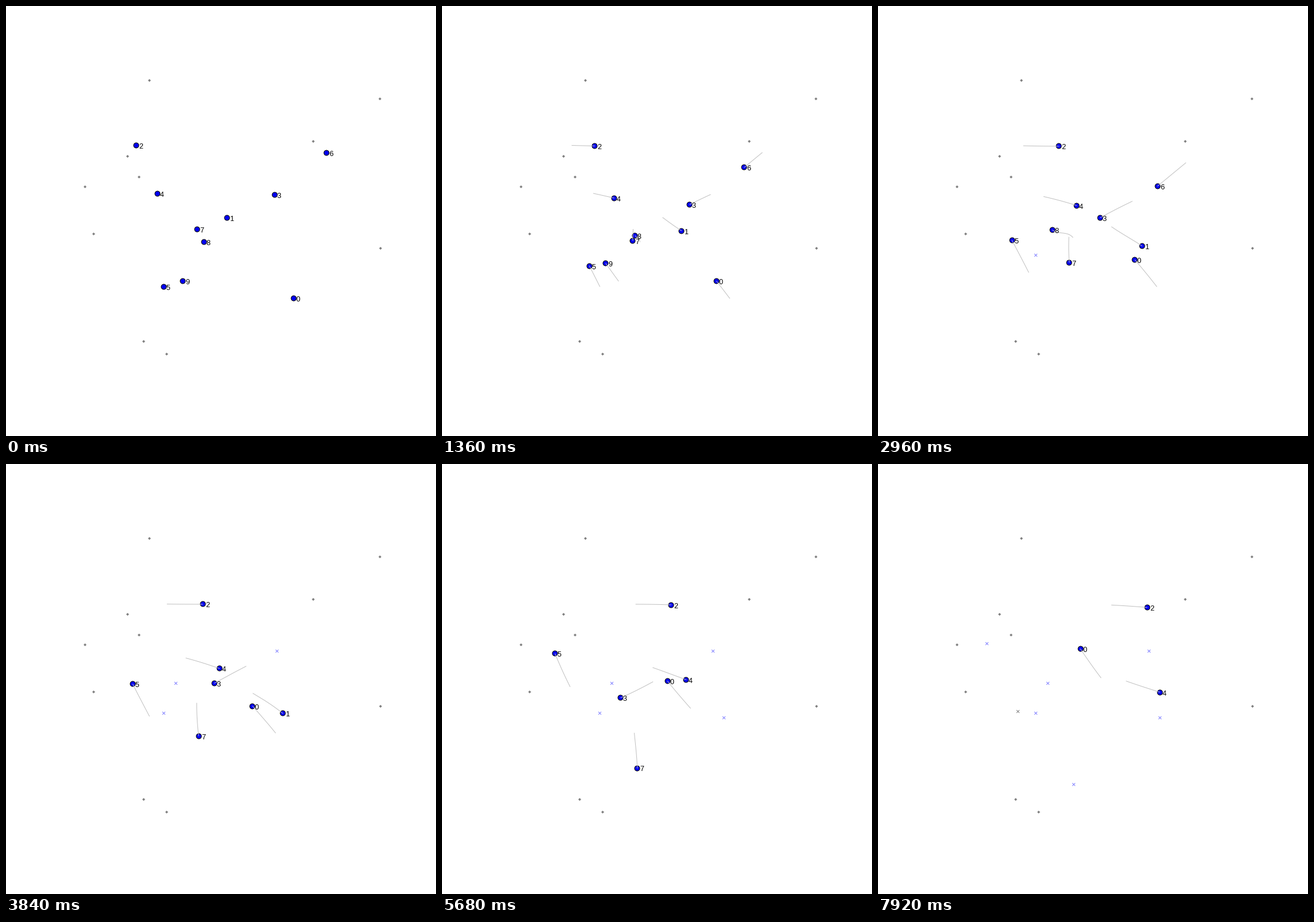
Animation of 748 by 748 pixels, one loop 8 s. Source, as a matplotlib script:

```python
import numpy as np
import matplotlib.pyplot as plt
from matplotlib.animation import FuncAnimation
from matplotlib.patches import Circle, RegularPolygon

SIZE, DPI = 748, 100
FRAMES, INTERVAL = 100, 80
PX = 72 / DPI
TRAIL = 25      # frames of history behind each agent
CRUISE = 2.47   # pixels per frame
GIVE_WAY = 26   # frames during which late agents hold back

GOALS = [(249, 129), (650, 161), (534, 235), (211, 261), (231, 297),
         (137, 314), (152, 396), (651, 421), (239, 583), (279, 605)]


def travel(distance, duration):
    """Distance covered at each frame: soft start, cruise, late agents slower."""
    t = np.linspace(0, duration, 20 * FRAMES)
    hold = max(0, duration - 1 - distance / CRUISE) / GIVE_WAY
    pace = 1 - 0.5 * np.exp(-t / 2)
    pace *= 1 - hold / (1 + np.exp((t - GIVE_WAY) / 2))
    covered = np.concatenate([[0], np.cumsum((pace[1:] + pace[:-1]) / 2)])
    return np.interp(np.arange(FRAMES), t, covered / covered[-1])


def curved_path(start, end, duration, bow, sway):
    """Near-straight walk with a sideways bow and an S-shaped sway."""
    start, end = np.array(start), np.array(end)
    step = end - start
    distance = np.hypot(*step)
    normal = np.array([-step[1], step[0]]) / distance
    u = travel(distance, duration)[:, None]
    side = bow * np.sin(np.pi * u) + sway * np.sin(2 * np.pi * u)
    return start + step * u + normal * side


def to_pixel(point):
    return np.floor(point) + 0.5


fig = plt.figure(figsize=(SIZE / DPI, SIZE / DPI), dpi=DPI, facecolor="white")
ax = fig.add_axes([0, 0, 1, 1])
ax.set_xlim(0, SIZE)
ax.set_ylim(SIZE, 0)
ax.axis("off")


class Agent:
    count = 0

    def __init__(self, start, end, died=None, bow=0, sway=0):
        duration = died + 0.5 if died else FRAMES - 1
        self.died = died or FRAMES
        self.track = curved_path(start, end, duration, bow, sway)
        self.body = ax.add_patch(Circle(start, 4.5, fc="#0000f0", ec="black",
                                        lw=PX, zorder=3))
        self.trail, = ax.plot([], [], color="#c0c0c0", lw=PX, zorder=4)
        self.label = ax.text(0, 0, str(Agent.count), fontsize=12.5 * PX,
                             family="Liberation Sans", zorder=5)
        x, y = to_pixel(end)
        r = 2.5
        self.cross, = ax.plot([x - r, x + r, np.nan, x - r, x + r],
                              [y - r, y + r, np.nan, y + r, y - r],
                              lw=PX, solid_capstyle="butt", zorder=1)
        Agent.count += 1

    def show(self, frame):
        alive = frame < self.died
        for artist in (self.body, self.trail, self.label):
            artist.set_visible(alive)
        self.cross.set_visible(not alive)
        self.cross.set_color("#808080" if frame == self.died else "#8080ff")
        x, y = to_pixel(self.track[frame])
        self.body.center = x, y
        self.label.set_position((x + 4.5, y + 5))
        self.trail.set_data(*self.track[max(0, frame - TRAIL):frame + 1].T)


for goal in GOALS:
    ax.add_patch(RegularPolygon(to_pixel(goal), 4, radius=2.5, fc="#808080",
                                lw=0, orientation=0, zorder=1))

agents = [
    Agent((500.5, 508.5), (352, 321.5), bow=-2, sway=1.8),
    Agent((384, 368), (490.5, 441), died=52, bow=-0.8, sway=1.2),
    Agent((226, 242.5), (468, 249.5), bow=-2, sway=0.9),
    Agent((467, 328), (243.5, 430.5), died=99, bow=-5.2, sway=2.3),
    Agent((263.5, 326), (490.5, 397), bow=-3.5, sway=-1.6),
    Agent((274.5, 488), (189.5, 312.5), died=78, bow=-2.4, sway=0.8),
    Agent((557, 255), (471.5, 325.5), died=44),
    Agent((332.5, 388.5), (340.5, 557.5), died=82, bow=1.5, sway=1.5),
    Agent((344.5, 410), (295.5, 381.5), died=41, bow=1, sway=4),
    Agent((307, 478.5), (274.5, 433.5), died=24),
]


def update(frame):
    for agent in agents:
        agent.show(frame)
    return []


anim = FuncAnimation(fig, update, frames=FRAMES, interval=INTERVAL,
                     repeat=True, repeat_delay=0, blit=False)
plt.show()
```
